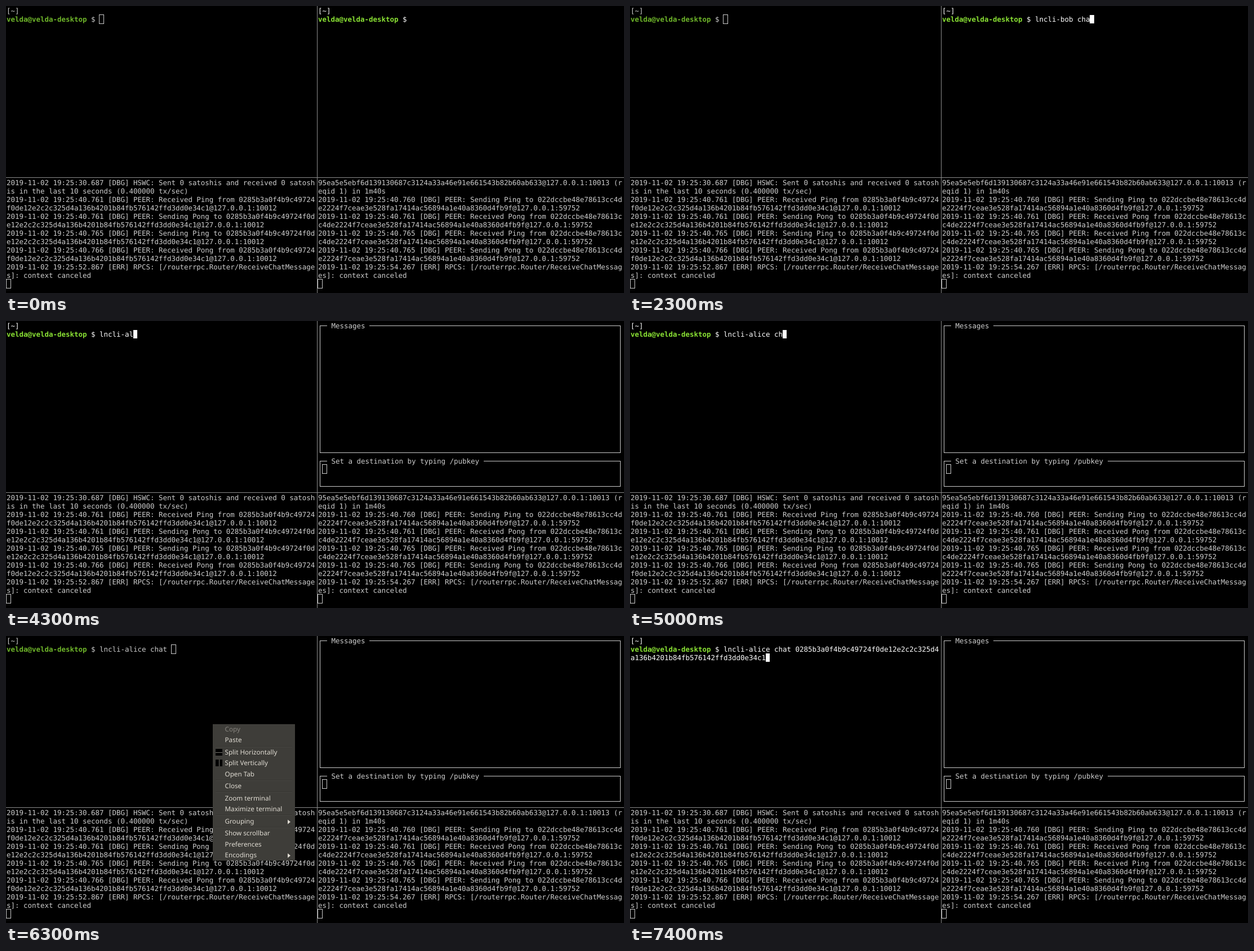
Recreate the animation shown at these times as an HTML page. Size 1097x511 px, loop 8 s.

```html
<!DOCTYPE html>
<html lang="en">
<head>
<meta charset="utf-8">
<title>Split terminal</title>
<style>
html, body { margin: 0; width: 100%; height: 100%; overflow: hidden; background: #000; }
#stage { position: absolute; left: 0; top: 0; width: 1097px; height: 511px; overflow: hidden; background: #000; }
#stage * { position: absolute; box-sizing: border-box; }
.pane { margin: 0; color: #ccc; white-space: pre; font: 12.5px/15px "DejaVu Sans Mono", monospace;
  letter-spacing: -.026px; text-rendering: geometricPrecision; }
#stage .pane span, #stage .pane b, #stage .pane i { position: static; }
.pane b { color: #6eb52a; }
.pane.focus { color: #fff; }
.pane.focus b { color: #8ae234; }
.left { left: .9px; }
.right { left: 553.9px; }
.top { top: 1px; }
.bottom { top: 307px; }
.pane i { display: inline-block; width: 9px; height: 17px; margin: -1px -1px -1px -.5px; vertical-align: top; border: 1px solid #ccc; }
.pane.focus i { width: 7.5px; height: 15px; margin: 0; border: 0; background: #fff; }
.rule { background: #8c8c8c; }
.frame { border: 1px solid #ccc; left: 557px; width: 534px; }
.title { left: 12px; top: -8px; padding: 0 7.5px; background: #000; }
#menu { left: 367px; top: 157px; width: 146px; height: 243px; background: #3e3d39; color: #dfdbd2;
  font: 11.7px/19px "Noto Sans", sans-serif; text-rendering: geometricPrecision; }
.item { left: 0; width: 146px; height: 19px; padding-left: 21.5px; white-space: pre; }
.item.off { color: #85837d; }
.item.hot { color: #fff; background: linear-gradient(#f08451, #e9733d); border: solid #d9612b; border-width: 1px 0; line-height: 17px; }
.sep { left: 5px; width: 136px; height: 2px; background: #373632; border-bottom: 1px solid #464541; }
.icon { left: 5px; width: 12px; height: 12px; background: #000; }
.icon::after { content: ""; position: absolute; background: #77756f; }
.icon.h::after { left: 0; top: 5.5px; width: 12px; height: 1px; }
.icon.v::after { left: 5.5px; top: 0; width: 1px; height: 12px; }
.arrow { left: 133px; border: solid transparent; border-width: 4px 0 4px 5px; border-left-color: #dfdbd2; }
</style>
</head>
<body>
<div id="stage">
  <pre class="pane left top" id="alice"></pre>
  <pre class="pane right top" id="bob"></pre>
  <div id="chat">
    <div class="frame" style="top:8px;height:227px"><pre class="pane title">Messages</pre></div>
    <div class="frame" style="top:249px;height:46px"><pre class="pane title">Set a destination by typing /pubkey</pre></div>
    <pre class="pane" style="left:561.4px;top:256px"><i></i></pre>
  </div>
  <pre class="pane left bottom">2019-11-02 19:25:30.687 [DBG] HSWC: Sent 0 satoshis and received 0 satosh
is in the last 10 seconds (0.400000 tx/sec)
2019-11-02 19:25:40.761 [DBG] PEER: Received Ping from 0285b3a0f4b9c49724
f0de12e2c2c325d4a136b4201b84fb576142ffd3dd0e34c1@127.0.0.1:10012
2019-11-02 19:25:40.761 [DBG] PEER: Sending Pong to 0285b3a0f4b9c49724f0d
e12e2c2c325d4a136b4201b84fb576142ffd3dd0e34c1@127.0.0.1:10012
2019-11-02 19:25:40.765 [DBG] PEER: Sending Ping to 0285b3a0f4b9c49724f0d
e12e2c2c325d4a136b4201b84fb576142ffd3dd0e34c1@127.0.0.1:10012
2019-11-02 19:25:40.766 [DBG] PEER: Received Pong from 0285b3a0f4b9c49724
f0de12e2c2c325d4a136b4201b84fb576142ffd3dd0e34c1@127.0.0.1:10012
2019-11-02 19:25:52.867 [ERR] RPCS: [/routerrpc.Router/ReceiveChatMessage
s]: context canceled
<i></i></pre>
  <pre class="pane right bottom">95ea5e5ebf6d139130687c3124a33a46e91e661543b82b60ab633@127.0.0.1:10013 (r
eqid 1) in 1m40s
2019-11-02 19:25:40.760 [DBG] PEER: Sending Ping to 022dccbe48e78613cc4d
e2224f7ceae3e528fa17414ac56894a1e40a8360d4fb9f@127.0.0.1:59752
2019-11-02 19:25:40.761 [DBG] PEER: Received Pong from 022dccbe48e78613c
c4de2224f7ceae3e528fa17414ac56894a1e40a8360d4fb9f@127.0.0.1:59752
2019-11-02 19:25:40.765 [DBG] PEER: Received Ping from 022dccbe48e78613c
c4de2224f7ceae3e528fa17414ac56894a1e40a8360d4fb9f@127.0.0.1:59752
2019-11-02 19:25:40.765 [DBG] PEER: Sending Pong to 022dccbe48e78613cc4d
e2224f7ceae3e528fa17414ac56894a1e40a8360d4fb9f@127.0.0.1:59752
2019-11-02 19:25:54.267 [ERR] RPCS: [/routerrpc.Router/ReceiveChatMessag
es]: context canceled
<i></i></pre>
  <div class="rule" style="left:552px;top:0;width:1px;height:511px"></div>
  <div class="rule" style="left:0;top:305px;width:1097px;height:1px"></div>
  <div id="menu"></div>
</div>
<script>
const LOOP = 8000;
const $ = id => document.getElementById(id);
const menu = $('menu');

function add(cls, top, text = '') {
  const el = document.createElement('div');
  el.className = cls;
  el.style.top = top + 'px';
  el.textContent = text;
  menu.append(el);
  return el;
}

// Menu groups are divided by separators.
const groups = [
  ['Copy', 'Paste'],
  ['Split Horizontally', 'Split Vertically', 'Open Tab'],
  ['Close'],
  ['Zoom terminal', 'Maximize terminal'],
  ['Grouping'],
  ['Show scrollbar', 'Preferences', 'Encodings']
];
const items = {};
let y = 0;
groups.forEach((group, n) => {
  if (n) { add('sep', Math.round(y)); y += 2.3; }
  for (const name of group) {
    items[name] = add('item', Math.round(y), name);
    if (name === 'Grouping' || name === 'Encodings') add('arrow', Math.round(y) + 6);
    y += 19.3;
  }
});
items.Copy.classList.add('off');
add('icon h', 44);
add('icon v', 63);

function terminal(id) {
  const el = $(id);
  el.innerHTML = '[~]\n<b>velda@velda-desktop</b> $ <span></span><i></i>';
  return { el, text: el.querySelector('span'), cursor: el.querySelector('i') };
}
const alice = terminal('alice'), bob = terminal('bob');

// One key time per character.
const aliceCmd = 'lncli-alice chat ';
const aliceKeys = [3600, 3600, 3800, 3900, 3900, 4100, 4300, 4300, 4500, 4700, 4800, 4900, 5000, 5000, 5200, 5300, 5600];
const bobCmd = 'lncli-bob chat';
const bobKeys = [700, 800, 1000, 1100, 1200, 1400, 1700, 1800, 1900, 2000, 2100, 2200, 2300, 2400];
const pubkey = '0285b3a0f4b9c49724f0de12e2c2c325d4\na136b4201b84fb576142ffd3dd0e34c1';

const typed = (cmd, keys, t) => cmd.slice(0, keys.filter(k => k <= t).length);
const show = (el, on) => { el.style.visibility = on ? 'visible' : 'hidden'; };

function update(term, text, focus, cursor) {
  if (term.text.textContent !== text) term.text.textContent = text;
  term.el.classList.toggle('focus', focus);
  show(term.cursor, cursor);
}

function draw(t) {
  const chat = t >= 3600, pasted = t >= 7400, menuOpen = t >= 6300 && !pasted;
  update(alice, typed(aliceCmd, aliceKeys, t) + (pasted ? pubkey : ''),
    chat && !menuOpen, t < 6100 || t >= 6300);
  update(bob, typed(bobCmd, bobKeys, t), true, t >= 400 && !chat);
  show(bob.el, !chat);
  show($('chat'), chat);
  show(menu, menuOpen);
  items.Paste.classList.toggle('hot', t >= 6700 && menuOpen);
}

const start = performance.now();
function tick() {
  draw((performance.now() - start) % LOOP);
  requestAnimationFrame(tick);
}
draw(0);
tick();
</script>
</body>
</html>
```
